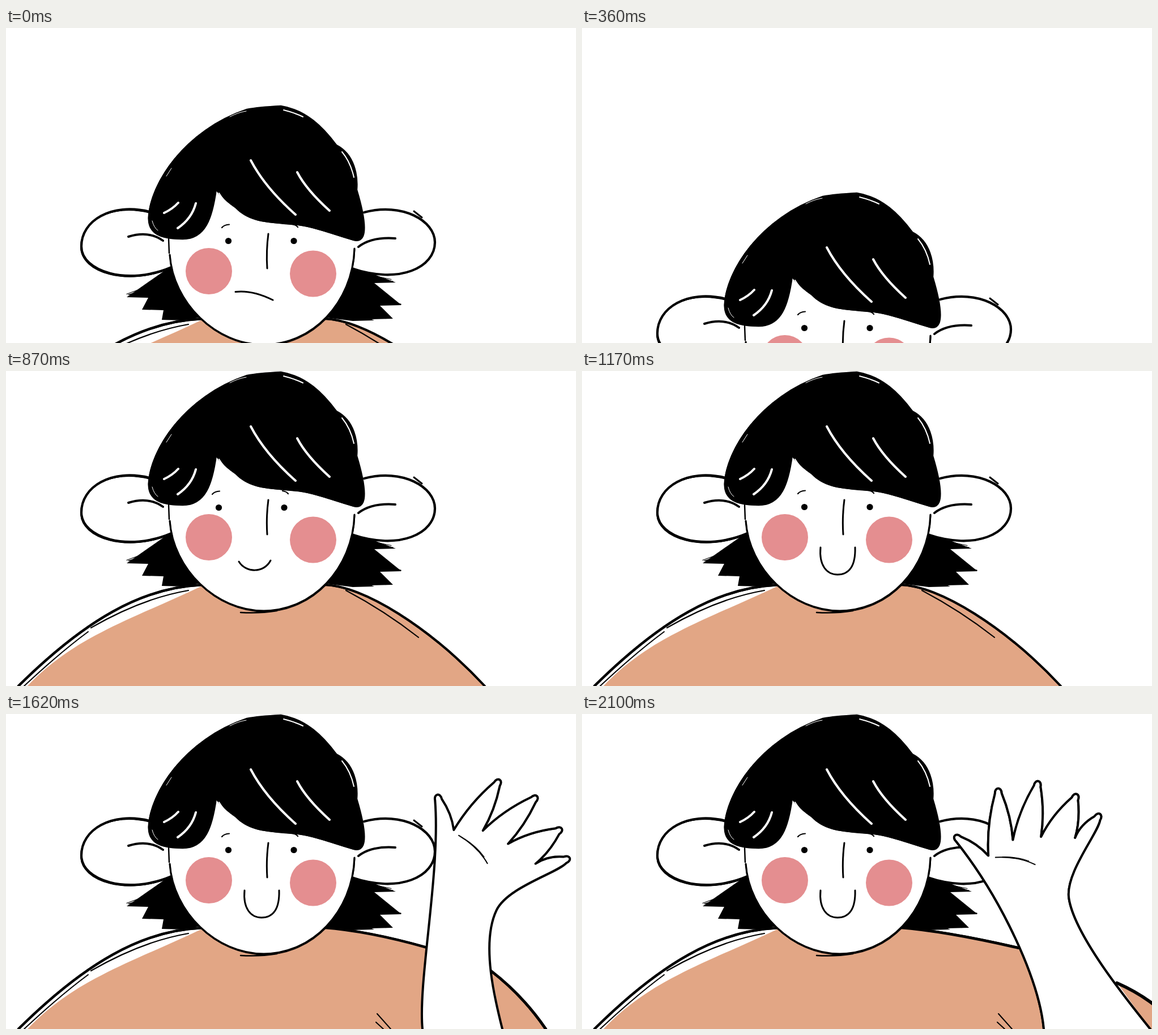
An HTML page that plays this animation: 1006x557 px, repeating every 2.28 s.

```html
<!DOCTYPE html>
<html lang="en">
<head>
<meta charset="utf-8">
<title>Hello wave</title>
<style>
  html, body { margin: 0; width: 100%; height: 100%; overflow: hidden; background: #fff; }
  svg { display: block; width: 100%; height: 100%; }
  path { stroke-linecap: round; stroke-linejoin: round; }
</style>
</head>
<body>
<svg viewBox="0 0 1006 557">
  <g id="figure">
    <g id="body"></g>
    <g id="head"></g>
    <g id="gaze"></g>
    <g id="mouth"></g>
  </g>
  <g id="arm"></g>
</svg>
<script>
const LOOP = 2280, FLOOR = 557;
const INK = '#000', SHIRT = '#e2a685', CHEEK = '#e48e90', WHITE = '#fff';
const $ = id => document.getElementById(id);

let seed = 7;
const random = () => (seed = seed * 16807 % 2147483647) / 2147483647;
const jitter = size => (random() * 2 - 1) * size;

function add(parent, tag, attrs) {
  const el = document.createElementNS('http://www.w3.org/2000/svg', tag);
  for (const k in attrs) el.setAttribute(k, attrs[k]);
  return parent.appendChild(el);
}
const fill = (g, d, color = INK) => add(g, 'path', { d, fill: color });
const line = (g, d, width, color = INK) =>
  add(g, 'path', { d, fill: 'none', stroke: color, 'stroke-width': width });

// A pen line with a few loose, thinner passes over it
function sketch(g, d, width, passes = 2) {
  line(g, d, width);
  for (let i = 0; i < passes; i++) {
    line(g, d, width * 0.4).setAttribute('transform',
      `translate(${jitter(2).toFixed(1)} ${jitter(2).toFixed(1)})`);
  }
}

// Points are [x, y]
const mix = (p, q, k) => [p[0] + (q[0] - p[0]) * k, p[1] + (q[1] - p[1]) * k];
const push = (p, v, k) => [p[0] + v[0] * k, p[1] + v[1] * k];

// Hand, drawn upright; each pose turns it as one piece
const PIVOT = [808.5, 192];
const TIPS = [[680, 190], [768, 119], [840, 117], [904, 150], [939, 191]];
const BASES = [[715, 262], [733, 234], [780, 213], [830, 215], [889, 226], [905, 250]];
const WRIST = [862, 330];

// Foot: where the forearm's two edges leave the stage
const POSES = {
  left: { angle: -8.7, at: [785.5, 197.5], foot: [815, 1003], shoulder: [770, 414], sleeve: [[944, 475], [1040, 540]] },
  middle: { angle: 0, at: PIVOT, foot: [782, 957], shoulder: [760, 410], sleeve: [[901, 447], [1002, 557]] },
  right: { angle: 25.4, at: [876.5, 199.5], foot: [735, 876], shoulder: [742, 413], sleeve: [[856, 454], [953, 557]] }
};

function turner({ angle, at }) {
  const c = Math.cos(angle * Math.PI / 180), s = Math.sin(angle * Math.PI / 180);
  return ([px, py]) => {
    const x = px - PIVOT[0], y = py - PIVOT[1];
    return [at[0] + x * c - y * s, at[1] + x * s + y * c];
  };
}

// Two bowed sides that meet in a round tip
function finger(a, tip, b) {
  const base = mix(a, b, 0.5);
  const len = Math.hypot(tip[0] - base[0], tip[1] - base[1]);
  const up = [(tip[0] - base[0]) / len, (tip[1] - base[1]) / len];
  const out = [up[1], -up[0]];
  const neck = push(tip, up, -9);
  const l = push(neck, out, 6), r = push(neck, out, -6);
  return {
    l,
    left: [push(mix(a, l, 0.5), out, 9), l],
    cap: [push(l, up, 12), push(r, up, 12), r],
    right: [push(mix(r, b, 0.5), out, -7), b]
  };
}

function buildArm(pose) {
  const g = add($('arm'), 'g', {});
  const turn = turner(pose);
  const to = (cmd, pts) => cmd + pts.map(p => turn(p).map(v => v.toFixed(1))).join(' ');
  const [inner, outer] = pose.foot;
  const fingers = TIPS.map((tip, i) =>
    finger(i === 1 ? BASES[1] : BASES[i], tip, BASES[i + 1]));

  const thumb = turn(fingers[0].l);
  const elbow = turn(push(WRIST, [0, 1], 65));
  let d = `M${inner} ${FLOOR}C${inner - 8} 470 ${turn(push(fingers[0].l, [64, 112], 1))} ${thumb}`;
  fingers.forEach((f, i) => {
    if (i) d += to('Q', f.left);
    d += to('C', f.cap);
    if (i < 4) d += to('Q', f.right);
  });
  d += to('C', [[930, 225], [862, 285], WRIST]);
  d += `C${elbow} ${mix(elbow, [outer, FLOOR], 0.67)} ${outer} ${FLOOR}`;

  const [from, end] = pose.sleeve;
  const sleeve = `M${from}Q${push(mix(from, end, 0.5), [8, -8], 1)} ${end}`;
  fill(g, `${sleeve}V${FLOOR}H${outer}Z`, SHIRT);
  sketch(g, sleeve, 4.5);
  fill(g, d + 'Z', WHITE);
  sketch(g, d, 4, 1);
  line(g, to('M', [[745, 239]]) + to('Q', [[785, 243], [812, 262]]), 2);
  line(g, to('M', [[757, 240]]) + to('Q', [[782, 243], [802, 254]]), 1.2);

  const x = inner - 80;
  line(g, `M${x} 530l24 27m-26 -12l13 12`, 2);
  return g;
}

// Shirt: with a pose the right shoulder is lifted towards the arm
function buildShirt(pose) {
  const g = add($('body'), 'g', {});
  const edge = pose ? `Q640 384 ${pose.shoulder}` : 'C630 378 750 455 845 557';
  const tail = pose ? `l20 6L${pose.foot[0] + 20} ${FLOOR}` : '';
  fill(g, `M38 557C120 470 220 440 346 380L560 378${edge}${tail}Z`, SHIRT);
  sketch(g, 'M560 378' + edge, 4);
  if (!pose) line(g, 'M600 388Q668 424 728 471', 2.2);
  return g;
}

function buildShoulder() {
  const g = $('body');
  sketch(g, 'M345 378C240 383 140 440 22 557', 4.5);
  line(g, 'M322 388Q240 402 150 454', 2.2);
  line(g, 'M145 461Q95 498 32 557', 2);
}

// Spiky hair: each tip falls back inwards before the next
function tuft(g, root, tips, inward) {
  const spikes = tips.map(([x, y]) => `L${x} ${y}L${x + inward * 38} ${y + 1}`).join('');
  fill(g, `M${root}${spikes}L${root[0] + inward * 55} 375V325Z`);
  for (const [x, y] of tips) {
    for (let i = 0; i < 3; i++) {
      line(g, `M${x + inward * random() * 14} ${y - random() * 6}l${inward * 45} ${jitter(6) - 14}`, 1.2);
    }
  }
}

function buildHead() {
  const g = $('head');
  tuft(g, [290, 286], [[213, 340], [240, 362], [275, 380]], 1);
  tuft(g, [612, 286], [[688, 314], [698, 354], [683, 378], [650, 381]], -1);

  const ears = [
    'M254 189C185 172 133 205 133 250C133 295 215 320 292 287',
    'M632 190C700 172 757 205 757 243C757 287 695 318 610 289'
  ];
  for (const d of ears) {
    fill(g, d + 'Z', WHITE);
    sketch(g, d, 4.2);
  }
  line(g, 'M720 188L734 199', 3);
  line(g, 'M216 233Q252 222 277 240M622 251Q645 233 687 236', 4);

  const jaw = 'M289 265C295 350 370 424 455 424C540 424 612 350 615 254';
  fill(g, jaw + 'L610 200H300L287 235Z', WHITE);
  sketch(g, jaw, 3.2);
  line(g, 'M414 427Q448 429 478 424M287 236L288 262', 2.5);

  for (const [cx, cy] of [[358, 294], [542, 298.5]]) {
    add(g, 'circle', { cx, cy, r: 41, fill: CHEEK });
  }
  line(g, 'M463 228Q459 258 461 289', 3);

  const fringe = 'M371 149C364 200 352 237 312 237C285 236 252 235 252 200';
  const crown = 'C254 140 315 45 425 8C445 4 465 3 485 2C530 9 560 40 583 71';
  const side = 'C615 87 621 125 619 150C631 190 635 220 630 232C626 241 618 240 614 239';
  const bangs = 'C575 228 540 213 505 211C460 207 430 207 405 181C388 169 378 160 371 149';
  const hair = fringe + crown + side + bangs;
  fill(g, hair + 'Z');
  sketch(g, hair, 2.5, 1);

  // Gaps and highlights
  line(g, 'M376 156Q384 169 394 176M593 83Q608 101 614 128M490 9Q510 14 524 21', 2, WHITE);
  line(g, 'M395 21Q410 13 424 11M283 126L292 112M258 205Q261 217 268 222', 1, WHITE);
  line(g, 'M432 98Q457 146 511 194M514 119Q530 150 571 187' +
    'M304 173Q294 184 279 191M335 174Q328 201 303 218', 4, WHITE);

  const gaze = $('gaze');
  for (const cx of [392.5, 508]) add(gaze, 'circle', { cx, cy: 240.5, r: 5.6, fill: INK });
  line(gaze, 'M381 217Q385 212 394 211.5M505 211Q512 212 515 216', 2.2);
}

const MOUTHS = {
  sad: 'M405 330.5C427 328 449 334 471 345',
  soft: 'M411 337C423 357 455 358 467 335',
  smile: 'M421 312C418 344 432 360 451 360C472 360 483 344 482 312'
};

buildHead();
const shirts = { none: buildShirt() }, arms = {}, mouths = {};
for (const k in POSES) {
  shirts[k] = buildShirt(POSES[k]);
  arms[k] = buildArm(POSES[k]);
}
for (const k in MOUTHS) mouths[k] = line($('mouth'), MOUTHS[k], 3);
buildShoulder();

// Value of the last key reached at time t
const hold = (t, keys) => keys.filter(k => k[0] <= t).pop()[1];
const only = (set, name) => {
  for (const k in set) set[k].style.display = k === name ? '' : 'none';
};

function draw(t) {
  const drop = hold(t, [[0, 136], [210, 230], [360, 290], [540, 0]]);
  const gaze = hold(t, [[0, '0 0'], [690, '-17 1'], [1020, '24 1'], [1170, '0 0']]);
  const mouth = hold(t, [[0, 'sad'], [870, 'soft'], [1170, 'smile']]);
  const pose = hold(t, [[0, 'none'], [1290, 'left'], [1470, 'middle'], [1590, 'right'], [1950, 'middle'], [2100, 'left']]);
  $('figure').setAttribute('transform', `translate(0 ${drop})`);
  $('gaze').setAttribute('transform', `translate(${gaze})`);
  only(mouths, mouth);
  only(shirts, pose);
  only(arms, pose);
}

const start = performance.now();
function tick() {
  draw((performance.now() - start) % LOOP);
  requestAnimationFrame(tick);
}
tick();
</script>
</body>
</html>
```
